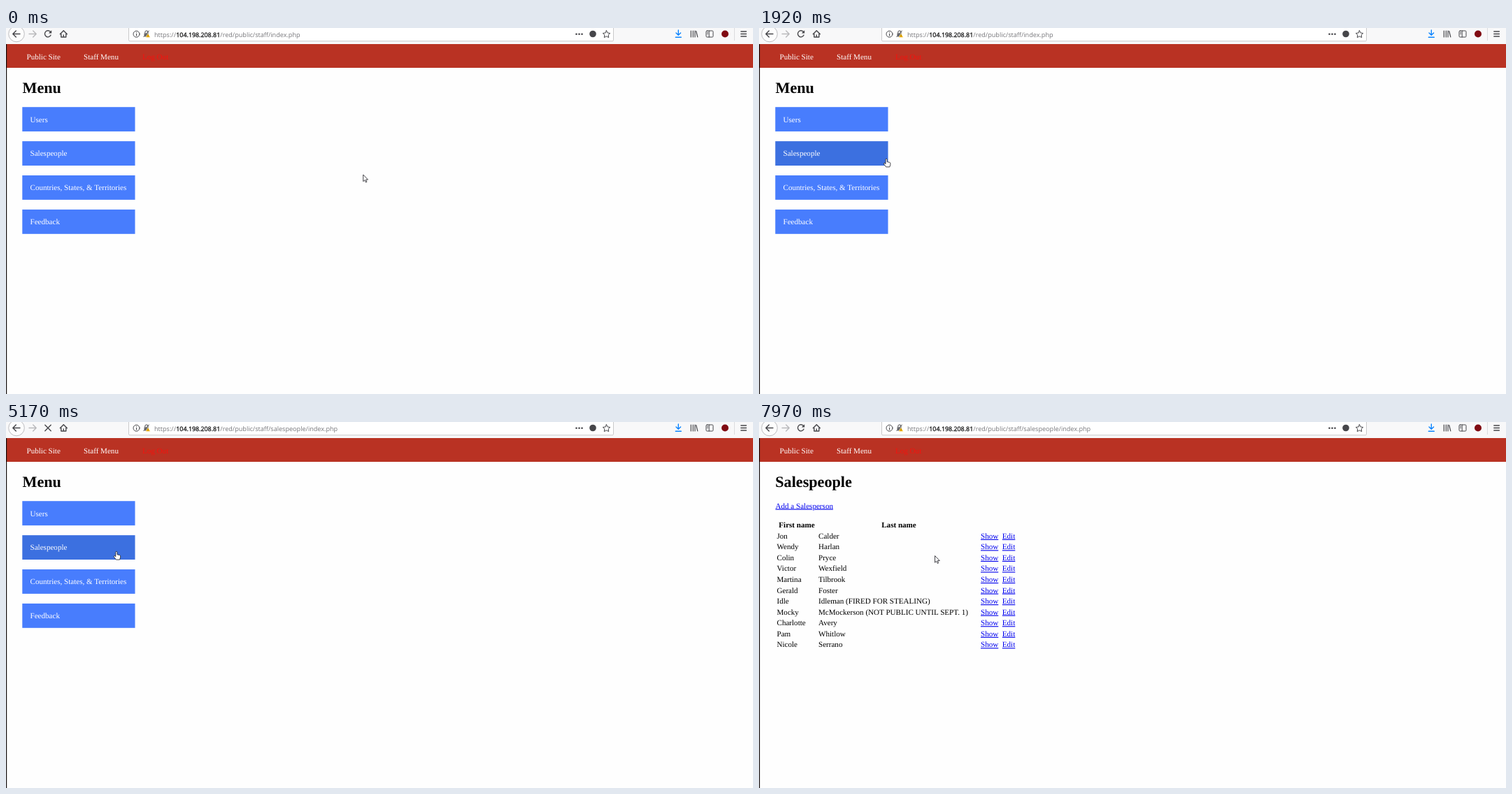
An HTML page for the animation above (8 s loop, 1068 by 524 pixels).

```html
<!DOCTYPE html>
<html lang="en">
<head>
<meta charset="utf-8">
<title>Staff menu</title>
<style>
  html, body { margin: 0; width: 100%; height: 100%; overflow: hidden; background: #fefefe; }
  svg { display: block; width: 100%; height: 100%; }
  text { font: 11.08px "Liberation Serif", "Times New Roman", serif; text-rendering: geometricPrecision; white-space: pre; }
  .h1 { font-size: 22.15px; font-weight: bold; }
  .th { font-weight: bold; text-anchor: middle; }
  .w { fill: #fff; }
  .link { fill: #0000ee; text-decoration: underline; }
  .url { font: 9.1px "Open Sans", "Noto Sans", sans-serif; fill: #77777b; }
  .host { font-size: 8.9px; fill: #0c0c0d; stroke: #0c0c0d; stroke-width: .25; }
  .ico { fill: none; stroke: #46464a; stroke-width: 1.4; stroke-linecap: round; stroke-linejoin: round; }
</style>
</head>
<body>
<svg viewBox="0 0 1068 524" preserveAspectRatio="none">
  <rect width="1068" height="524" fill="#fefefe"/>

  <g id="toolbar">
    <rect width="1068" height="23" fill="#f8f8f9"/>
    <rect x="175.5" y="-4" width="693" height="22.8" rx="1.5" fill="#fff" stroke="#c9c9cb"/>
    <circle cx="15" cy="8.5" r="11.3" fill="#fdfdfd" stroke="#b5b5b8" stroke-width=".9"/>
    <g class="ico">
      <path d="M20 8.5H10M14.3 4L9.8 8.5l4.5 4.5"/>
      <path d="M33 8.5h10M38.7 4l4.500 4.500-4.500 4.500" stroke="#b9b9bc"/>
      <path d="M77.300 8.800L82.300 3.800l5 5M78.800 8.500v4.500h7V8.500M82.300 13v-3"/>
      <g stroke-width="1">
        <circle cx="186.500" cy="8.700" r="4.500"/>
        <path d="M186.500 8.300v2.800M186.500 6.200v.2"/>
        <path d="M198.800 7.500V6a2.100 2.100 0 0 1 4.200 0v1.500M196.800 12.500l7.500-8.500"/>
        <path d="M858.500 3.700l1.600 3.300 3.600.5-2.600 2.500.6 3.600-3.200-1.700-3.200 1.700.6-3.600-2.600-2.500 3.600-.5z"/>
        <rect x="1001" y="4" width="10" height="9" rx="1.300"/>
        <path d="M1005.200 4v9M1002.700 6.300h1M1002.700 8.300h1"/>
      </g>
      <path d="M979.300 4v9M982.300 4v9M985 4v9M986.700 4.500l2.100 8.300" stroke-width="1.200"/>
      <path d="M1050.800 5h7.600M1050.800 8.500h7.600M1050.800 12h7.600"/>
      <path d="M961.300 3v7M958 7l3.300 3.200L964.600 7M957.300 13.300h8" stroke="#0a84ff"/>
    </g>
    <rect x="197.500" y="7.500" width="6.500" height="5" rx=".8" fill="#67676b"/>
    <path d="M203 7.700l3.300 5.800h-6.600z" fill="#f5b400" stroke="#fff" stroke-width=".5"/>
    <path d="M203 9.700v1.500M203 12v.6" stroke="#5c4300" stroke-width=".8"/>
    <g fill="#46464a">
      <circle cx="815.500" cy="8.700" r="1.300"/><circle cx="819.500" cy="8.700" r="1.300"/><circle cx="823.500" cy="8.700" r="1.300"/>
      <circle cx="839" cy="8.500" r="4.800"/>
    </g>
    <circle cx="1028" cy="8.500" r="5" fill="#800b12"/>
    <path d="M1041.500 0v18" stroke="#dcdcde"/>
    <text class="url" x="212" y="12.700">https://<tspan class="host" x="243.300">104.198.208.81</tspan><tspan id="path" x="306.300"></tspan></text>
    <g class="ico" id="reload">
      <g id="arrow">
        <path id="arc" pathLength="100" d="M64 10.300A4.500 4.500 0 1 1 63.300 5.300"/>
        <path id="tip" d="M65.200 3.200v4.400h-4.400z" fill="#46464a" stroke="none"/>
      </g>
      <path id="cross" d="M-4.200-4.200l8.400 8.400M4.200-4.200l-8.400 8.400"/>
    </g>
  </g>

  <rect y="23" width="1068" height="34" fill="#b93223"/>
  <text class="w" x="29.500" y="45">Public Site</text>
  <text class="w" x="111" y="45">Staff Menu</text>
  <text x="195" y="45" fill="#f5120e">Log Out</text>
  <rect y="23" width="1.200" height="501" fill="#16100f"/>

  <g id="menu"><text class="h1" x="23.500" y="93">Menu</text></g>
  <g id="people">
    <text class="h1" x="23.300" y="93">Salespeople</text>
    <text class="link" x="23.500" y="123.500">Add a Salesperson</text>
    <text class="th" x="54" y="151.200">First name</text>
    <text class="th" x="200" y="151.200">Last name</text>
  </g>

  <g id="cursor" stroke="#25252b" stroke-width=".85" stroke-linejoin="round" fill="#fff">
    <path id="pointer" d="M0 0v9.700l2.200-2 1.500 3.300 1.500-.7-1.400-3.200h3z"/>
    <path id="hand" d="M-1.200 1.200a1.100 1.100 0 0 1 2.200 0v3.300l3.600.8q1 .3 1 1.300v2l-1 3.200H-.6l-2.900-3.800q-.9-1.400.2-1.800.7-.2 2.100 1.300z"/>
  </g>
</svg>
<script>
const LOOP = 8000, STEP = 77;
const $ = id => document.getElementById(id);
const clamp = (v, a = 0, b = 1) => Math.min(b, Math.max(a, v));
const mix = (a, b, p) => a + (b - a) * p;
const smooth = p => p * p * (3 - 2 * p);
const set = (el, attrs) => { for (const k in attrs) el.setAttribute(k, attrs[k]); };
const show = (el, on) => set(el, { visibility: on ? 'visible' : 'hidden' });

// Fraction of n equal steps already taken, the first one at `start`
const stepped = (t, start, n, len = STEP) => clamp(Math.floor((t - start) / len) + 1, 0, n) / n;

function add(parent, tag, attrs, text = '') {
  const el = document.createElementNS('http://www.w3.org/2000/svg', tag);
  set(el, attrs);
  el.textContent = text;
  return parent.appendChild(el);
}

const buttons = ['Users', 'Salespeople', 'Countries, States, & Territories', 'Feedback'].map((label, i) => {
  const y = 113.2 + i * 48.9;
  const box = add($('menu'), 'rect', { x: 23.3, y, width: 161.2, height: 34.9, fill: '#487dfd' });
  add($('menu'), 'text', { class: 'w', x: 34.5, y: y + 21.3 }, label);
  return box;
});

const staff = [
  ['Jon', 'Calder'], ['Wendy', 'Harlan'], ['Colin', 'Pryce'], ['Victor', 'Wexfield'],
  ['Martina', 'Tilbrook'], ['Gerald', 'Foster'], ['Idle', 'Idleman (FIRED FOR STEALING)'],
  ['Mocky', 'McMockerson (NOT PUBLIC UNTIL SEPT. 1)'], ['Charlotte', 'Avery'],
  ['Pam', 'Whitlow'], ['Nicole', 'Serrano']
];
staff.forEach(([first, last], i) => {
  const y = 166.8 + i * 15.55;
  [[25.5, first], [85, last], [317, 'Show', 'link'], [347.8, 'Edit', 'link']].forEach(
    ([x, label, cls = '']) => add($('people'), 'text', { x, y, class: cls }, label));
});

function cursorAt(t) {
  if (t < 2150) {
    const p = smooth(Math.pow(stepped(t, 1300, 11), .85));
    return [mix(510.7, 159, p), mix(210, 185.5, p)];
  }
  if (t < 5260) return [158, 185.3];
  const p = Math.pow(stepped(t, 7740, 4), 1.4);
  return [mix(157.6, 251.5, p), mix(185, 191.5, p)];
}

// cross: 0 is the reload arrow, 1 is the stop cross
function drawReload(cross, color) {
  const arc = clamp(1 - cross * 1.6), size = clamp((cross - .35) / .65);
  set($('reload'), { style: `stroke:${color}` });
  set($('tip'), { fill: color });
  show($('arrow'), arc > 0);
  show($('cross'), size > 0);
  set($('arrow'), { transform: `rotate(${cross * 180} 60 8.500)` });
  set($('arc'), { 'stroke-dasharray': `0 ${100 * (1 - arc)} 100 100` });
  set($('cross'), { transform: `translate(60 8.500) scale(${size})` });
}

function draw(t) {
  const loaded = t >= 5260;
  const [x, y] = cursorAt(t);
  const hover = !loaded && x < 184.5;
  show($('menu'), !loaded);
  show($('people'), loaded);
  set(buttons[1], { fill: hover ? '#3c70e0' : '#487dfd' });
  $('path').textContent = `/red/public/staff/${t >= 5170 ? 'salespeople/' : ''}index.php`;
  set($('cursor'), { transform: `translate(${x} ${y})` });
  show($('hand'), hover);
  show($('pointer'), !hover);
  const cross = loaded ? 1 - stepped(t, 5360, 6, 72) : stepped(t, 2460, 8);
  drawReload(cross, loaded && t < 5950 ? '#b4b4b7' : '#46464a');
}

function tick() {
  draw(performance.now() % LOOP);
  requestAnimationFrame(tick);
}
tick();
</script>
</body>
</html>
```
